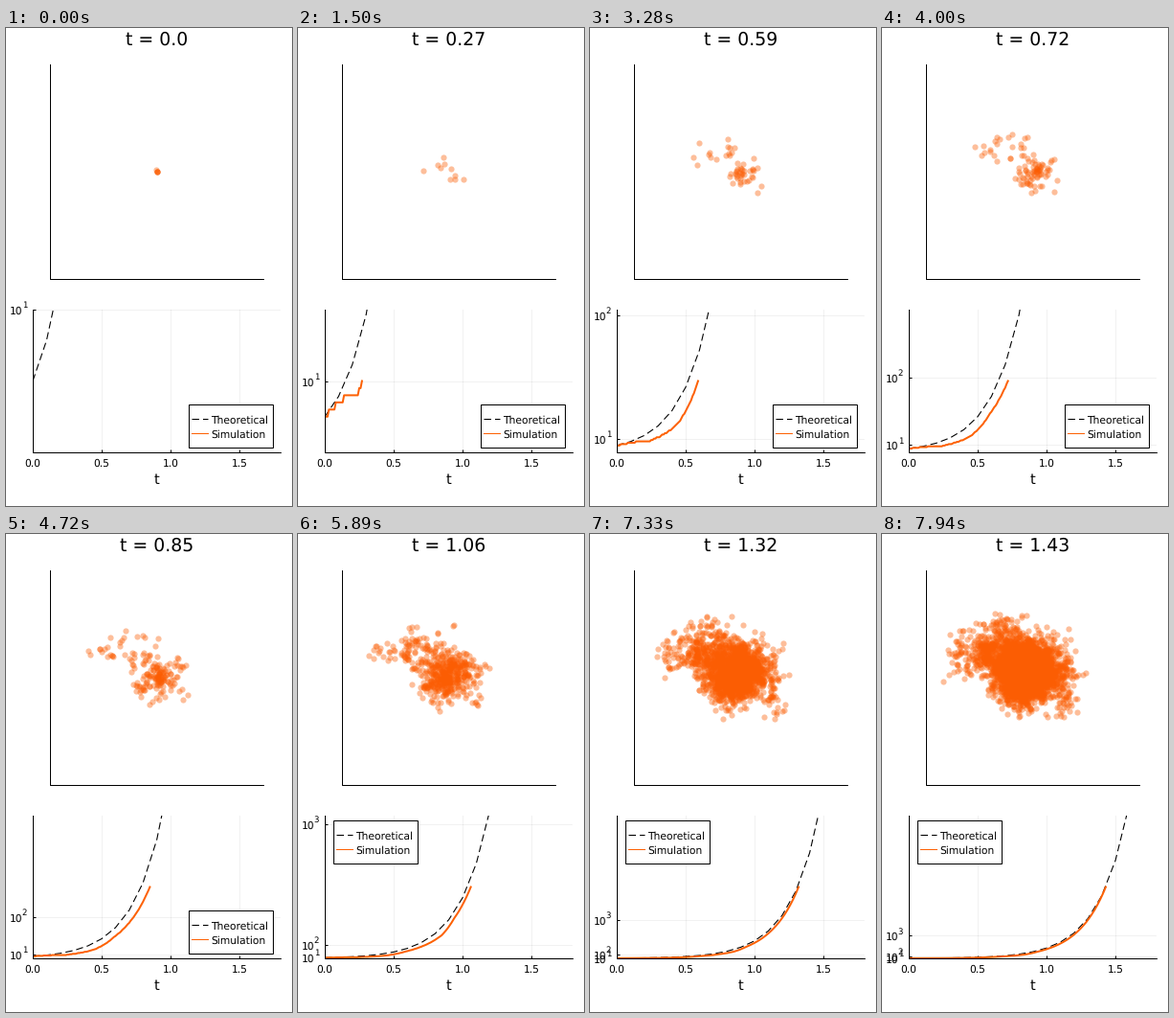
These frames come from a looping animation (299 px wide and 499 px high, 8 s). A matplotlib script:

```python
import numpy as np
import matplotlib.pyplot as plt
from matplotlib.animation import FuncAnimation
from matplotlib.patches import Rectangle

W, H, DPI = 299, 499, 64
FRAMES, STEP_MS = 144, 55.5
LINE, DOT = "#fd6104", "#fb5d03"
LEGEND_MOVE = 88            # step at which the legend changes corner
STEP_STD = 1.6              # pixels per step
SIDE_SHARE = 0.09           # part of all births in the side branch

plt.rcParams["font.family"] = "DejaVu Sans"
plt.rcParams["text.hinting"] = "none"


def px(size):
    """Pixels to points."""
    return size * 72 / DPI


def theory(t):
    return 5 * np.exp(4.5 * t)


def path(k, keys, xs, ys):
    return np.array([np.interp(k, keys, xs), np.interp(k, keys, ys)])


# The simulated population lags behind the theory, then catches up
steps = np.arange(FRAMES)
times = steps / 100
lag = np.interp(times, [0, 0.1, 0.24, 0.44, 0.59, 0.85, 0.94, 1.21, 1.43],
                [1, 0.9, 0.57, 0.57, 0.73, 0.755, 0.87, 0.94, 1])
counts = np.maximum.accumulate(np.rint(theory(times) * lag).astype(int))


def branching_walk():
    """Two branches of random walkers, each centred on its own path."""
    rng = np.random.default_rng(5)
    pos = np.full((5, 2), (158.0, 150.0))
    pos[0] = 156.5, 148
    side = np.arange(5) == 0
    history = [pos.copy()]
    for k in steps[1:]:
        new_side = rng.random(counts[k] - len(pos)) < SIDE_SHARE
        parents = [rng.choice(np.flatnonzero(side == s)) for s in new_side]
        pos = np.vstack([pos, pos[np.array(parents, int)]])
        side = np.append(side, new_side)
        pos += rng.normal(0, STEP_STD, pos.shape)
        main_mid = path(k, [0, 85, 143], [158, 157, 151], [150, 147, 143])
        side_mid = path(k, [0, 27, 85], [156.5, 131, 108], [148, 149, 119])
        for group, mid in ((~side, main_mid), (side, side_mid)):
            pos[group] += mid - pos[group].mean(axis=0)
        history.append(pos.copy())
    return history


history = branching_walk()

fig = plt.figure(figsize=(W / DPI, H / DPI), dpi=DPI, facecolor="white")

# Growth plot
X0, X1, Y0, Y1 = 28, 287.2, 294, 443
ax = fig.add_axes([X0 / W, 1 - Y1 / H, (X1 - X0) / W, (Y1 - Y0) / H])
ax.set_xlim(0, 1.8)
ax.set_xticks([0, 0.5, 1, 1.5], ["0.0", "0.5", "1.0", "1.5"])
ax.set_yticks([10, 100, 1000], [""] * 3)
ax.tick_params(direction="in", length=px(3), width=px(1),
               labelsize=px(10.67), pad=px(6.5))
ax.grid(color="black", alpha=0.07, lw=px(0.8))
ax.set_axisbelow(True)
for side in ("top", "right"):
    ax.spines[side].set_visible(False)
for side in ("left", "bottom"):
    ax.spines[side].set_linewidth(px(1))


def tick_text(value, s, size, dx, dy, ha):
    ax.annotate(s, (0, value), (px(dx), px(dy)), textcoords="offset points",
                size=px(size), ha=ha, va="baseline", annotation_clip=True)


for e in (1, 2, 3):
    tick_text(10 ** e, "10", 10.67, -11, -5, "right")
    tick_text(10 ** e, str(e), 8.5, -11.3, 1.5, "left")

DASH = (0, (7.5 / 1.1, 4 / 1.1))
ts = np.arange(0, 1.81, 0.1)
ax.plot(ts, theory(ts), color="black", lw=px(1.1), ls=DASH,
        dash_capstyle="butt")
sim, = ax.plot([], [], color=LINE, lw=px(2), solid_joinstyle="round")

# Overlay in pixel coordinates: walkers, title and legend
top = fig.add_axes([0, 0, 1, 1])
top.set_xlim(0, W)
top.set_ylim(H, 0)
top.axis("off")
top.plot([46, 46, 269], [38, 262, 262], color="black", lw=px(1))
dots, = top.plot([], [], "o", ms=px(6.2), mew=0, color=DOT, alpha=0.4)
title = top.text(157.8, 18, "", size=px(18.9), ha="center", va="baseline")
top.text(157.5, 475.5, "t", size=px(14.67), ha="center", va="baseline")

box = Rectangle((0, 0), 88, 45, fc="white", ec="black", lw=px(1), zorder=3)
top.add_patch(box)
keys = [top.plot([], [], color="black", lw=px(1.1), ls=DASH,
                 dash_capstyle="butt", zorder=4)[0],
        top.plot([], [], color=LINE, lw=px(1), zorder=4)[0]]
names = [top.text(0, 0, s, size=px(10.8), va="baseline", zorder=4)
         for s in ("Theoretical", "Simulation")]


def place_legend(x, y):
    box.set_xy((x, y))
    for i, (key, name) in enumerate(zip(keys, names)):
        row = y + 15 + 15 * i
        key.set_data([x + 3, x + 20], [row, row])
        name.set_position((x + 23, row + 4.5))


def draw(k):
    title.set_text(f"t = {round(k / 100, 2)}")
    dots.set_data(*history[k].T)
    sim.set_data(times[:k + 1], counts[:k + 1])
    ax.set_ylim(0, 2 * counts[k])
    place_legend(*((191, 393) if k < LEGEND_MOVE else (37, 299)))
    return dots, sim, title


anim = FuncAnimation(fig, draw, frames=FRAMES, interval=STEP_MS,
                     init_func=lambda: draw(0), repeat=True, repeat_delay=0,
                     blit=False)
plt.show()
```
